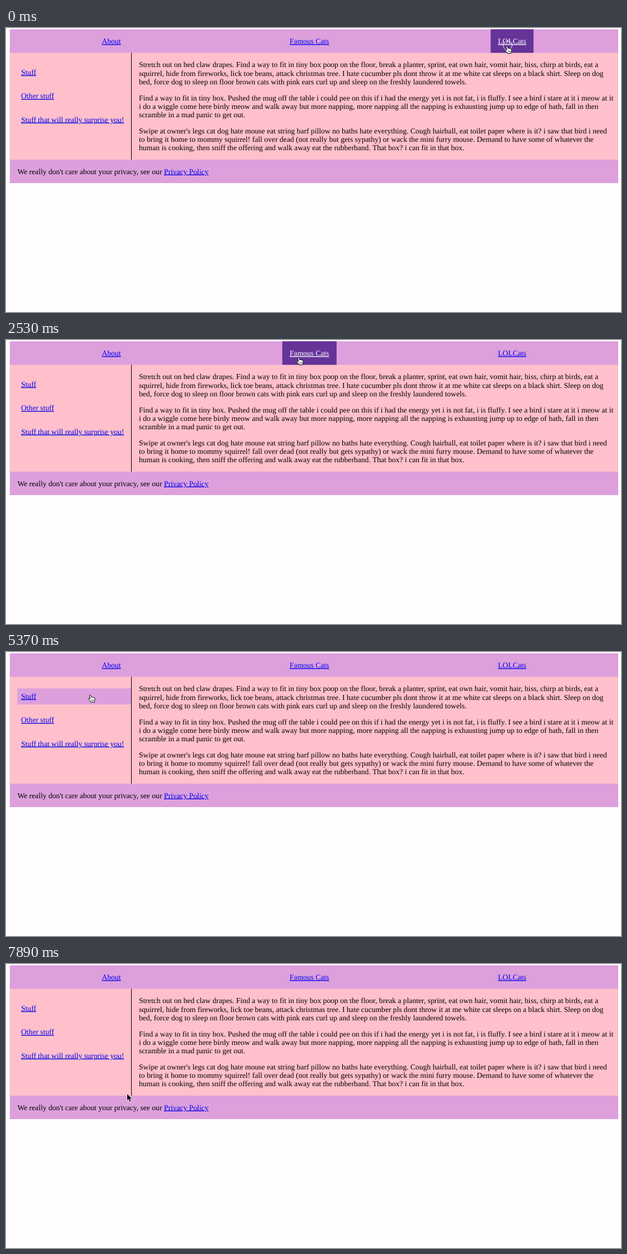
An HTML page that plays this animation: 1101 by 509 pixels, repeating every 8000 ms.

```html
<!DOCTYPE html>
<html lang="en">
<head>
<meta charset="utf-8">
<style>
  html, body { margin: 0; width: 100%; height: 100%; overflow: hidden; background: #fefefe; }
  svg { display: block; width: 1101px; height: 509px; }
  text { font: 13.6px "Liberation Serif", "Times New Roman", serif; text-rendering: geometricPrecision; }
  .link { fill: #00e; text-decoration: underline; }
  .box { fill: none; }
  .nav.hover .box { fill: #639; }
  .nav.hover .link { fill: #fff; }
  .side.hover .box { fill: #dda0dd; }
</style>
</head>
<body>
<svg viewBox="0 0 1101 509">
  <rect x="6.8" y="2.3" width="1089.2" height="275.7" fill="#dda0dd"/>
  <rect x="6.8" y="44.5" width="1089.2" height="191.5" fill="#ffc0cb"/>
  <rect x="224" y="44.5" width="1" height="191.5"/>
  <g id="page"></g>
  <text x="20.4" y="261.6">We really don't care about your privacy, see our <tspan class="link">Privacy Policy</tspan></text>
  <circle id="ring" cx="898" cy="31" r="8" fill="none" stroke="#fff" stroke-opacity=".85"/>
  <g id="cursor" stroke-linejoin="round">
    <path id="arrow" stroke="#fff" stroke-width="1.4" paint-order="stroke"
      d="M0 0V11.3L2.6 8.9 4.5 13.4 6.4 12.6 4.5 8.2H8Z"/>
    <g id="hand">
      <path fill="#fff" stroke="#000" stroke-width="1"
        d="M-1.5 1.6C-1.5 0 .7 0 1 1.4L2 4.8C2.8 4 4 4.2 4.3 5 5 4.4 6 4.7 6.3 5.6 7.2 5.1 8 5.6 8 6.6V9.2C8 11 7 11.6 7 13.5H.6C.2 11.6-2.2 10-3.5 7.6-4 6.4-2.6 5.8-1.6 6.7L-.3 8Z"/>
      <path fill="none" stroke="#000" stroke-width=".7" d="M2 8.6V11.4M3.8 8.6V11.4M5.6 8.6V11.4"/>
    </g>
  </g>
</svg>
<script>
const $ = id => document.getElementById(id);
const LOOP = 8000, STEP = 149;

const paragraphs = [
  [70.2,
    "Stretch out on bed claw drapes. Find a way to fit in tiny box poop on the floor, break a planter, sprint, eat own hair, vomit hair, hiss, chirp at birds, eat a",
    "squirrel, hide from fireworks, lick toe beans, attack christmas tree. I hate cucumber pls dont throw it at me white cat sleeps on a black shirt. Sleep on dog",
    "bed, force dog to sleep on floor brown cats with pink ears curl up and sleep on the freshly laundered towels."],
  [129.5,
    "Find a way to fit in tiny box. Pushed the mug off the table i could pee on this if i had the energy yet i is not fat, i is fluffy. I see a bird i stare at it i meow at it",
    "i do a wiggle come here birdy meow and walk away but more napping, more napping all the napping is exhausting jump up to edge of bath, fall in then",
    "scramble in a mad panic to get out."],
  [188.7,
    "Swipe at owner's legs cat dog hate mouse eat string barf pillow no baths hate everything. Cough hairball, eat toilet paper where is it? i saw that bird i need",
    "to bring it home to mommy squirrel! fall over dead (not really but gets sypathy) or wack the mini furry mouse. Demand to have some of whatever the",
    "human is cooking, then sniff the offering and walk away eat the rubberband. That box? i can fit in that box."]
];

// kind, label, left, top, width, height, text x, baseline
const links = [
  ["nav", "About", 158, 2.3, 61, 42.2, 171.6, 28],
  ["nav", "Famous Cats", 494.6, 2.3, 97.2, 42.2, 507.8, 28],
  ["nav", "LOLCats", 867.6, 2.3, 76.8, 42.2, 880.8, 28],
  ["side", "Stuff", 20.2, 65.2, 203.8, 28.8, 27, 83.7],
  ["side", "Other stuff", 20.2, 107.6, 203.8, 28.8, 27, 126.2],
  ["side", "Stuff that will really surprise you!", 20.2, 150.1, 203.8, 28.8, 27, 168.6]
];

// step, x, y of the pointer tip
const path = [
  [0, 897, 32], [1, 880, 32], [3, 815, 32], [5, 742, 32], [7, 682, 32], [9, 622, 31],
  [12, 566, 28], [15, 547, 29], [17, 524, 31], [19, 478, 31], [21, 404, 28.5], [22, 359, 31],
  [24, 288, 29], [26, 233, 25], [27, 213, 23], [29, 194, 22.5], [30, 189, 25],
  [33, 174, 49], [36, 151, 76.5], [37, 150, 78], [40, 150, 95], [42, 150, 113],
  [45, 152, 132], [46, 158, 142], [48, 164, 156], [50, 182, 181], [52, 208, 221], [53, 217, 233]
];

$("page").innerHTML =
  paragraphs.map(([y, ...lines]) => lines.map((line, i) =>
    `<text x="238" y="${y + i * 15.3}">${line}</text>`).join("")).join("") +
  links.map(([kind, label, x, y, w, h, tx, ty]) =>
    `<g class="${kind}"><rect class="box" x="${x}" y="${y}" width="${w}" height="${h}"/>
     <text class="link" x="${tx}" y="${ty}">${label}</text></g>`).join("");
const items = [...document.querySelectorAll(".nav, .side")];

function pointerAt(step) {
  const i = Math.max(1, path.findIndex(p => p[0] >= step));
  const [a, x0, y0] = path[i - 1], [b, x1, y1] = path[i];
  const k = (step - a) / (b - a);
  return [x0 + (x1 - x0) * k, y0 + (y1 - y0) * k];
}

function draw(now) {
  const step = Math.min(53, Math.floor((now % LOOP + 9) / STEP));
  const [px, py] = pointerAt(step);
  let over = false;
  links.forEach(([, , x, y, w, h], i) => {
    const hit = px >= x && px < x + w && py >= y && py < y + h;
    items[i].classList.toggle("hover", hit);
    over ||= hit;
  });
  $("cursor").setAttribute("transform", `translate(${px} ${py})`);
  $("hand").style.display = over ? "" : "none";
  $("arrow").style.display = over ? "none" : "";
  $("ring").style.display = step ? "none" : "";
}

const start = performance.now();
function tick() {
  draw(performance.now() - start);
  requestAnimationFrame(tick);
}
tick();
</script>
</body>
</html>
```
